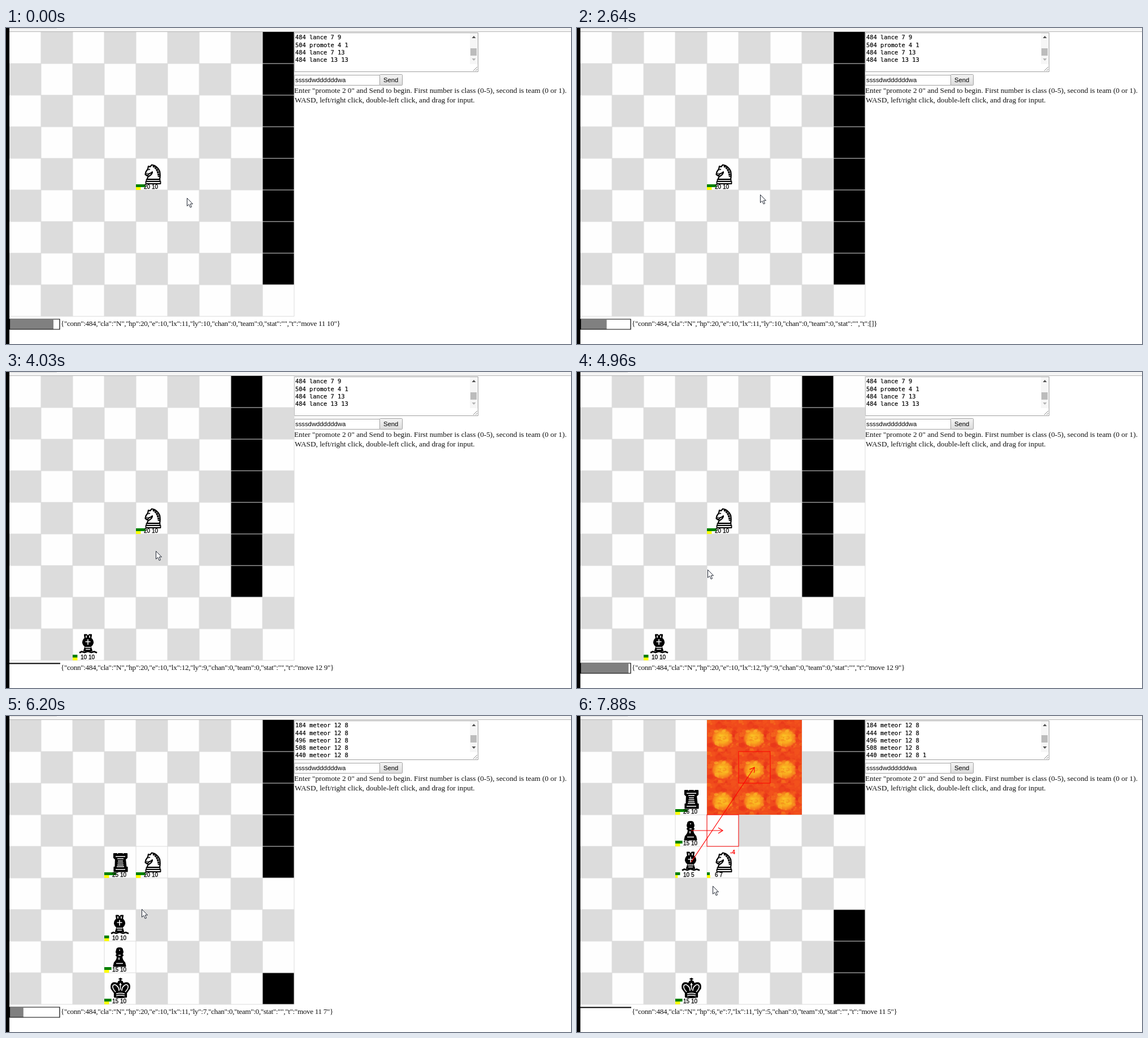
Write an HTML page that moves like this. It is 1000 by 560 pixels and loops after 8000 ms.

```html
<!DOCTYPE html>
<html lang="en">
<head>
<meta charset="utf-8">
<title>Board skirmish</title>
<style>
html, body { margin: 0; width: 100%; height: 100%; overflow: hidden; background: #fff; }
svg { display: block; width: 1000px; height: 560px; }
text { white-space: pre; }
.serif { font: 13.25px "Liberation Serif", "Times New Roman", serif; fill: #111; }
.status { letter-spacing: -.31px; font-size: 13.1px; }
.ui { font: 11.3px "Liberation Sans", Arial, sans-serif; }
.mono { font: 10.4px "DejaVu Sans Mono", monospace; stroke: #000; stroke-width: .2; }
.tag { font: 10px "Liberation Sans", Arial, sans-serif; stroke: #000; stroke-width: .3; }
.hit { font: bold 10px "Liberation Sans", Arial, sans-serif; fill: #f00; }
.ink { fill: #fff; stroke: #000; stroke-width: 2.2; stroke-linejoin: round; }
.solid { fill: #000; }
.trim { fill: none; stroke: #fff; stroke-width: 1.6; }
.aim { fill: none; stroke: #f00; }
</style>
</head>
<body>
<svg viewBox="0 0 1000 560">
  <defs>
    <linearGradient id="face" x2="0" y2="1"><stop stop-color="#f4f4f4"/><stop offset="1" stop-color="#dcdcdc"/></linearGradient>
    <radialGradient id="glow">
      <stop stop-color="#fcc824"/><stop offset=".5" stop-color="#f9a81e"/>
      <stop offset=".8" stop-color="#f78a1e" stop-opacity=".8"/><stop offset="1" stop-color="#f4601c" stop-opacity="0"/>
    </radialGradient>
    <clipPath id="cell"><path d="M0 0h56v56H0z"/></clipPath>
    <g id="knight" class="ink">
      <path d="M20 37Q20 33 24 31Q29 28 29 24Q26 27 23 27L20 31 16.500 28.500 17.500 24 21 19 22 14 25 15 28 11.500Q38 13 42 23Q43.500 30 42 37Z"/>
      <path d="M30 13.500Q39 18 40.500 33" fill="none" stroke-width="3.400" stroke-dasharray="3.500 .800"/>
      <path d="M22 20.500l3-1.500M18.500 28l2-2" fill="none" stroke-width="1.500"/>
      <path d="M18.500 37.500h24v3.500h-24zM17.500 41h26v4h-26z" stroke-width="1.800"/>
    </g>
    <g id="pawn" class="ink">
      <path class="solid" d="M23 23Q20 20 22 16Q22 12 27 12Q32 12 32 16Q34 20 31 23L33 25 31 27Q31 33 35 37H19Q23 33 23 27L21 25Z"/>
      <path class="solid" d="M18 38h18l1.500 6.500h-21z"/>
      <path class="trim" d="M26 16h2M25 25h4M26 29v4M21 39.500h12"/>
    </g>
    <g id="bishop" class="ink">
      <path class="solid" d="M22 17L21 10.500H24.500L27 14 29.500 10.500H33L32 17Q36 20 36 25Q35 29 32 31H22Q19 29 18 25Q18 20 22 17Z"/>
      <path class="trim" d="M27 18.500v10M22.500 23h9M24 12v4M30 12v4"/>
      <path class="solid" d="M22 33h10l2 6H20z"/><path class="trim" d="M22 33h10M23 36.500h8"/>
      <path d="M12 42.500l4-2 5 1.500 6-2 6 2 5-1.500 5 2" fill="none" stroke-width="2.800"/>
    </g>
    <g id="rook" class="ink">
      <path class="solid" d="M17 13h5v1.500h3V13h7v1.500h3V13h5v7l-3 3 1.500 14h2v7.500h-23V37h2L20 23l-3-3z"/>
      <path class="trim" d="M20 18h17M23 22h11M24 26h9M23.500 29.500h10M23 33h11M22 36h13M20 41h17"/>
    </g>
    <g id="king" class="ink">
      <path class="solid" d="M18 43L18 36 12.500 28Q11 20 16 18Q21 17 24 20Q24 15 28.500 14Q33 15 33 20Q36 17 41 18Q46 20 44.500 28L39 36V43Q28.500 45 18 43Z"/>
      <path d="M28.500 9v5M25.500 11h6" fill="none"/>
      <path class="trim" d="M20 34Q14 28 15 23Q18 19 22 23Q26 26 26 32M37 34Q43 28 42 23Q39 19 35 23Q31 26 31 32M28.500 18v12M26.500 21h4M21 37.500q7.500-2.500 15 0M21 41q7.500-2.500 15 0"/>
    </g>
    <g id="fire" clip-path="url(#cell)"></g>
  </defs>

  <path d="M0 0h1000v6H0z" fill="#f5f5f5"/>
  <path d="M0 0h90v1H0z" fill="#d8d8d8"/>
  <path d="M0 6.500h1000" stroke="#b4b4b4"/>
  <path d="M0 0h6v560H0z"/>

  <g fill="#fff" stroke="#a0a0a0">
    <path d="M510.500 8.500h325v69h-325z"/>
    <path d="M510.500 83.500h151v18h-151z"/>
    <rect x="661.500" y="82.500" width="40" height="19" rx="1" fill="url(#face)"/>
    <path d="M827 76l7-7M831 76l3-3" stroke="#888"/>
  </g>
  <path d="M821 9h14v55h-14z" fill="#f6f6f6"/>
  <path d="M824.500 18l3.500-4 3.500 4z" fill="#505050"/>
  <text class="ui" x="512" y="96">ssssdwddddddwa</text>
  <text class="ui" x="668" y="96">Send</text>
  <text class="serif" x="510" y="115">Enter "promote 2 0" and Send to begin. First number is class (0-5), second is team (0 or 1).</text>
  <text class="serif" x="511" y="132">WASD, left/right click, double-left click, and drag for input.</text>

  <g id="scene"></g>
  <path id="cursor" d="M.5 .5V14.500L3.800 11.500 6.200 17 8.500 16 6.200 10.800H10.500Z" fill="#fff" stroke="#222834"/>
</svg>
<script>
const LOOP = 8000, SIZE = 56, LEFT = 6, TOP = 7, SPAN = 9;
const byId = id => document.getElementById(id);

// Runs of screen refreshes: first, last, count.
const RUNS = [[0, 0, 1], [130, 1060, 8], [1180, 2130, 8], [2250, 3180, 8], [3310, 4310, 8],
  [4440, 5400, 8], [5550, 6500, 8], [6650, 7580, 8], [7730, 7880, 2]];
const TICKS = RUNS.flatMap(([a, b, n]) =>
  Array.from({ length: n }, (_, i) => n > 1 ? a + (b - a) * i / (n - 1) : a));

const LANCES = ["484 lance 7 9", "504 promote 4 1", "484 lance 7 13", "484 lance 13 13"];
const METEORS = [184, 444, 496, 508, 440].map(id => id + " meteor 12 8");

// One entry per game turn; coordinates are in board space.
const TURNS = [
  { at: -885, x: 11, y: 10 },
  { at: 15, x: 11, y: 10, idle: true },
  { at: 1118, x: 11, y: 10, idle: true },
  { at: 2125, x: 11, y: 10, idle: true },
  { at: 3042, x: 12, y: 10 },
  { at: 4020, x: 12, y: 9, units: [["bishop", 10, 5, 10, 10]] },
  { at: 5011, x: 12, y: 8, units: [["rook", 10, 6, 38, 10], ["bishop", 10, 5, 10, 10], ["king", 10, 4, 15, 10]] },
  { at: 5955, x: 11, y: 7, log: METEORS,
    units: [["rook", 10, 7, 25, 10], ["bishop", 10, 5, 10, 10], ["pawn", 10, 4, 15, 10], ["king", 10, 3, 15, 10]] },
  { at: 6910, x: 11, y: 6, hp: 10, e: 6.5, hit: "-10", channel: [10, 5], log: METEORS,
    units: [["rook", 10, 7, 25, 10], ["pawn", 10, 6, 15, 10], ["bishop", 10, 5, 10, 6.5], ["king", 10, 2, 15, 10]],
    aims: [[10, 7, 11, 7, 1], [10, 5, 12, 8, 1.8]] },
  { at: 7880, x: 11, y: 5, hp: 6, e: 7, hit: "-4", fire: [12, 8], log: [...METEORS.slice(0, 4), METEORS[4] + " 1"],
    units: [["rook", 10, 7, 26, 10], ["pawn", 10, 6, 15, 10], ["bishop", 10, 5, 10, 5], ["king", 10, 1, 15, 10]],
    aims: [[10, 6, 11, 6, 1], [10, 5, 12, 8, 1]] },
];

const POINTER = [[0, 320, 301], [2250, 320, 301], [3040, 327, 290], [4020, 265, 317],
  [5120, 226, 354], [6910, 249, 334], [7880, 240, 301], [8000, 240, 301]];

const rect = (x, y, w, h, fill) => `<rect x="${x}" y="${y}" width="${w}" height="${h}" fill="${fill}"/>`;
const label = (cls, x, y, s) => `<text class="${cls}" x="${x}" y="${y}">${s}</text>`;

function paintFire() {
  let seed = 11;
  const rnd = () => (seed = seed * 16807 % 2147483647) / 2147483647;
  const tones = ["#e62e1a", "#f3581c", "#f7781e", "#ea3a1a"];
  const blob = (x, y, r, fill, o) =>
    `<ellipse cx="${x}" cy="${y}" rx="${r}" ry="${r * (.5 + rnd() * .6)}" fill="${fill}" opacity="${o}"/>`;
  let s = rect(0, 0, SIZE, SIZE, "#f04a1c");
  for (let i = 0; i < 80; i++) s += blob(rnd() * SIZE, rnd() * SIZE, 1.5 + rnd() * 5, tones[i % 4], .5);
  s += '<ellipse cx="27" cy="32" rx="20" ry="18" fill="url(#glow)"/>';
  for (let i = 0; i < 40; i++) {
    const a = rnd() * 6.28, d = rnd() * 18;
    s += blob(27 + d * Math.cos(a), 32 + d * .9 * Math.sin(a), 1 + rnd() * 3, ["#fcc428", "#f3801a", "#f9a420"][i % 3], .5);
  }
  byId("fire").innerHTML = s;
}

function drawBoard(turn) {
  const { x: cx, y: cy, hp = 20, e = 10, units = [], aims = [] } = turn;
  const px = x => LEFT + (x - cx + 4) * SIZE;
  const py = y => TOP + (cy + 4 - y) * SIZE;
  let s = "";
  for (let x = cx - 4; x <= cx + 4; x++) for (let y = cy - 4; y <= cy + 4; y++) {
    const wall = x === 15 && (y >= 7 || y <= 3);
    s += rect(px(x), py(y), SIZE, SIZE, wall ? "#000" : (x + y) % 2 ? "#fefefe" : "#dcdcdc");
  }
  const all = [...units, ["knight", cx, cy, hp, e]];
  for (const [, x, y] of all) s += rect(px(x), py(y), SIZE, SIZE, "#fefefe");

  // Lines sit on whole pixels, so each one is softened over two.
  let grid = "";
  for (let i = 1; i <= SPAN; i++) {
    const d = i * SIZE, full = SPAN * SIZE;
    grid += `M${LEFT + d} ${TOP}v${full}M${LEFT} ${TOP + d}h${full}`;
  }
  s += `<path d="${grid}" stroke="#dcdcdc"/>`;

  for (const [kind, x, y, life, energy] of all) {
    const bars = rect(0, 46, life * .84, 5, "#008000") + rect(0, 51, energy * .84, 5, "#ff0");
    const chan = turn.channel && turn.channel[0] === x && turn.channel[1] === y
      ? rect(0, 40, 44, 5.5, "#0ee") : "";
    s += `<g transform="translate(${px(x)} ${py(y)})"><use href="#${kind}"/>${chan}${bars}${label("tag", 14, 54, life + " " + energy)}</g>`;
  }
  if (turn.hit) s += label("hit", px(cx) + 41, py(cy) + 14, turn.hit);

  if (turn.fire) {
    const [fx, fy] = turn.fire;
    for (let i = -1; i < 2; i++) for (let j = -1; j < 2; j++)
      s += `<use href="#fire" x="${px(fx + i)}" y="${py(fy + j)}"/>`;
  }
  for (const [x1, y1, x2, y2, w] of aims) {
    const half = SIZE / 2, ax = px(x1) + half, ay = py(y1) + half, bx = px(x2) + half, by = py(y2) + half;
    const angle = Math.atan2(by - ay, bx - ax) * 180 / Math.PI;
    s += `<g class="aim" stroke-width="${w}"><rect x="${px(x2)}" y="${py(y2)}" width="${SIZE}" height="${SIZE}"/>
      <path d="M${ax} ${ay}L${bx} ${by}" stroke-width="1.200"/>
      <path d="M-8-5L0 0L-8 5" stroke-width="1.200" transform="translate(${bx} ${by}) rotate(${angle})"/></g>`;
  }
  return s;
}

function drawLog(turn) {
  const busy = !!turn.log, lines = turn.log || LANCES;
  return lines.map((line, i) => label("mono", 512, 20.300 + i * 13.200, line)).join("")
    + rect(822, busy ? 34 : 36, 11, 13, "#bcbcbc")
    + `<path d="M824.500 54l3.500 4 3.500-4z" fill="${busy ? "#505050" : "#b4b4b4"}"/>`;
}

function drawStatus(turn, time) {
  const { x, y, hp = 20, e = 10 } = turn;
  const width = Math.min(87, (time - turn.at) * .087);
  const bar = width < 1 ? rect(6, 515.500, 90, 2, "#000")
    : rect(7, 517, width, 17, "#808080") + '<path d="M6.500 516h88.500v18h-88.500z" fill="none" stroke="#000" stroke-width="1.200"/>';
  const order = turn.idle ? "[]" : `"move ${x} ${y}"`;
  return bar + label("serif status", 97, 528,
    `{"conn":484,"cla":"N","hp":${hp},"e":${e},"lx":${x},"ly":${y},"chan":0,"team":0,"stat":"","t":${order}}`);
}

function pointerAt(time) {
  const i = POINTER.findIndex(p => p[0] > time), [t0, x0, y0] = POINTER[i - 1], [t1, x1, y1] = POINTER[i];
  const k = (time - t0) / (t1 - t0);
  return [Math.round(x0 + (x1 - x0) * k), Math.round(y0 + (y1 - y0) * k)];
}

let shown = -1;
function render(now) {
  const time = TICKS.findLast(t => t <= now % LOOP + 30);
  if (time === shown) return;
  shown = time;
  const turn = TURNS.findLast(t => t.at <= time);
  byId("scene").innerHTML = drawBoard(turn) + drawLog(turn) + drawStatus(turn, time);
  byId("cursor").setAttribute("transform", `translate(${pointerAt(time)})`);
}

paintFire();
const start = performance.now();
function loop() {
  render(performance.now() - start);
  requestAnimationFrame(loop);
}
loop();
</script>
</body>
</html>
```
